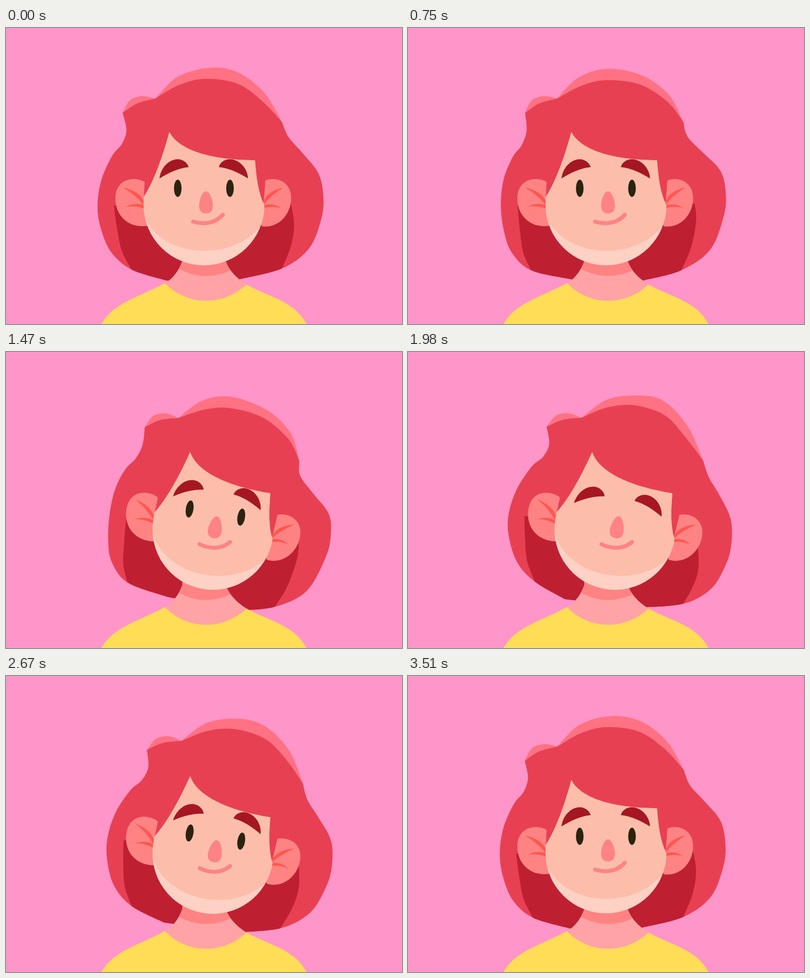
These frames come from a looping animation (800x600 px, 3.54 s). An HTML page with a canvas:

```html
<!DOCTYPE html>
<html lang="en">
<head>
<meta charset="utf-8">
<title>Head tilt</title>
<style>
  html, body { margin: 0; width: 100%; height: 100%; overflow: hidden; background: #ff95c8; }
  canvas { display: block; }
</style>
</head>
<body>
<canvas id="stage" width="800" height="600"></canvas>
<script>
const ctx = document.getElementById('stage').getContext('2d');
const LOOP = 3540;
const SWAY = LOOP / 4;
const PIVOT = { x: 402, y: 474 };
const TILT = 9 * Math.PI / 180;

const color = {
  bg: '#ff95c8', hair: '#e84053', shine: '#ff7283', deep: '#be2032',
  skin: '#fcbeaa', chin: '#fdd1c4', blush: '#ff8383', neck: '#ffa3a6',
  crease: '#ff5750', brow: '#a51723', eye: '#2b230e', shirt: '#ffdd57'
};

// Hair points: x, y at rest, then the shift at full sway.
const hair = {
  left: [[235, 172, 2, 0], [246, 206, -8, 2], [237, 234, -9, 4], [217, 257, -7, 6], [192, 310, 2, -5],
    [183, 365, 6, -10], [192, 410, 2, 0], [217, 457, -9, -2], [258, 489, -11, 3], [322, 514, 9, -6]],
  right: [[558, 190, -2, 1], [575, 222, -13, -2], [603, 256, -9, -4], [632, 300, -1, -13], [641, 355, 1, -27],
    [634, 400, 5, -25], [612, 447, -2, 3], [561, 485, -12, 8], [468, 508, 8, 5]],
  bump: [[250, 147, 0, 0], [275, 138, 0, 0]],
  bumpLow: [[265, 153, 0, 0]],
  joint: [[302, 143, -1, 0]],
  crown: [[350, 97, -7, 4], [420, 79, -22, 5], [466, 86, 9, 13], [517, 127, 13, 11]],
  crownLow: [[350, 114, 0, 4], [405, 101, -5, 6], [468, 112, 0, 3], [514, 148, 13, 2]],
  deepLeft: [[215, 360, 8, 0], [223, 403, 4, 10], [235, 450, -3, 6], [258, 491, -11, 3], [268, 520, -8, 0]],
  deepRight: [[573, 356, 8, 0], [582, 402, 0, -14], [579, 437, -9, 10], [561, 486, -12, 8], [545, 520, -10, 0]]
};

const clamp = v => Math.max(0, Math.min(1, v));
const smooth = v => { v = clamp(v); return v * v * (3 - 2 * v); };
const ramp = (t, from, to) => smooth((t - from) / (to - from));
const blinkAt = (t, center) => smooth(1.25 * (1 - Math.abs(t - center) / 160));

function track(t, keys) {
  const i = keys.findIndex(k => k[0] > t);
  if (i < 1) return 0;
  const [t0, a] = keys[i - 1], [t1, b] = keys[i];
  return a + (b - a) * (t - t0) / (t1 - t0);
}

function fill(path, style) {
  ctx.fillStyle = style;
  ctx.fill(typeof path === 'string' ? new Path2D(path) : path);
}

function clipped(path, draw) {
  ctx.save();
  ctx.clip(path);
  draw();
  ctx.restore();
}

// Continues a path through the points as a Catmull-Rom curve.
function spline(path, pts) {
  for (let i = 0; i < pts.length - 1; i++) {
    const a = pts[Math.max(0, i - 1)], b = pts[i], c = pts[i + 1], d = pts[Math.min(pts.length - 1, i + 2)];
    path.bezierCurveTo(b[0] + (c[0] - a[0]) / 6, b[1] + (c[1] - a[1]) / 6,
      c[0] - (d[0] - b[0]) / 6, c[1] - (d[1] - b[1]) / 6, c[0], c[1]);
  }
}

function outline(...runs) {
  const path = new Path2D();
  path.moveTo(...runs[0][0]);
  for (const run of runs) {
    path.lineTo(...run[0]);
    spline(path, run);
  }
  path.closePath();
  return path;
}

function drawHair(sway, lag) {
  const pose = ([x, y, dx, dy]) => {
    const reach = lag * clamp((400 - y + (x - 300) / 2) / 150);
    return [x + dx * sway - 7 * reach, y + dy * sway + 4.5 * reach];
  };
  const h = {};
  for (const name in hair) h[name] = hair[name].map(pose);
  const start = h.left[0], end = h.right[0], joint = h.joint[0];
  const leftUp = [...h.left].reverse();
  const shape = (bump, crown) => outline([start, ...bump, joint], [joint, ...crown, end], h.right, leftUp);

  fill(shape(h.bump, h.crown), color.shine);
  const body = shape(h.bumpLow, h.crownLow);
  fill(body, color.hair);
  clipped(body, () => fill(outline(h.deepLeft, [...h.deepRight].reverse()), color.deep));
}

const neck = new Path2D('M356 440V473C349 492 337 508 322 517L330 570H480L486 520C465 507 450 490 444 473V440Z');

function drawBody() {
  fill(neck, color.neck);
  clipped(neck, () => fill('M340 430V483L345 486Q402 518 459 489V430Z', color.blush));
  fill('M193 600C215 558 270 545 321 517C366 564 438 565 486 520C530 545 583 553 607 600Z', color.shirt);
}

function drawEars() {
  fill('M280 312C262 301 221 303 221 346C221 378 245 407 287 401L300 380L278 350Z', color.blush);
  fill('M524 309C545 301 576 310 576 345C576 378 550 407 517 402L505 380L521 350Z', color.blush);
  fill('M236 323Q269 331 278 350V359Q264 340 236 323Z', color.crease);
  fill('M241 363Q259 353 278 359V366Q260 359 241 363Z', color.crease);
  fill('M561 323Q530 330 521 350V358Q535 339 561 323Z', color.crease);
  fill('M556 365Q540 354 521 359V365Q538 360 556 365Z', color.crease);
}

const face = new Path2D('M330 211C352 252 425 268 503 268C506 305 509 330 521 358' +
  'L522 359A122 122 0 0 1 278 359V343C300 310 318 255 330 211Z');

function drawFace(blink) {
  fill(face, color.chin);
  clipped(face, () => fill('M270 200V379H278C315 472 470 476 522 390H530V200Z', color.skin));
  if (blink < 0.98) {
    for (const x of [347, 452.5]) {
      const eye = new Path2D();
      eye.ellipse(x, 325, 7.7, 17.5 * (1 - blink), 0, 0, 2 * Math.PI);
      fill(eye, color.eye);
    }
  }
  fill('M404 331C412 331 418 350 418 361C418 371 412 376 404 376C396 376 390 371 390 361C390 350 396 331 404 331Z', color.blush);
  ctx.strokeStyle = color.blush;
  ctx.lineWidth = 8;
  ctx.lineCap = 'round';
  ctx.stroke(new Path2D('M378 392.5C397 398 421 398 438 378.5'));

  ctx.save();
  ctx.translate(0, 13.5 * blink);
  fill('M310 305C313 282 330 266 347 266C358 266 367 274 369 282C349 284 329 293 310 305Z', color.brow);
  fill('M430 282C432 273 441 266 452 266C470 266 488 283 489 305C470 293 450 284 430 282Z', color.brow);
  ctx.restore();
}

function tilted(angle, draw) {
  ctx.save();
  ctx.translate(PIVOT.x, PIVOT.y);
  ctx.rotate(angle);
  ctx.translate(-PIVOT.x, -PIVOT.y);
  draw();
  ctx.restore();
}

function render(t) {
  const angle = TILT * (ramp(t, 1020, 1472) - ramp(t, 2868, 3368));
  const sway = 0.5 + 0.5 * Math.cos(2 * Math.PI * (t - 1500) / SWAY);
  const lag = track(t, [[1020, 0], [1300, 0.9], [1470, 0.75], [1980, 0.57], [2600, 0], [2720, 0], [3090, 1], [3420, 0]]);
  const blink = Math.max(blinkAt(t, 270), blinkAt(t, 1980));

  ctx.fillStyle = color.bg;
  ctx.fillRect(0, 0, 800, 600);
  tilted(angle, () => drawHair(sway, lag));
  drawBody();
  tilted(angle, () => { drawEars(); drawFace(blink); });
}

const began = performance.now();
function tick() {
  render((performance.now() - began) % LOOP);
  requestAnimationFrame(tick);
}
tick();
</script>
</body>
</html>
```
